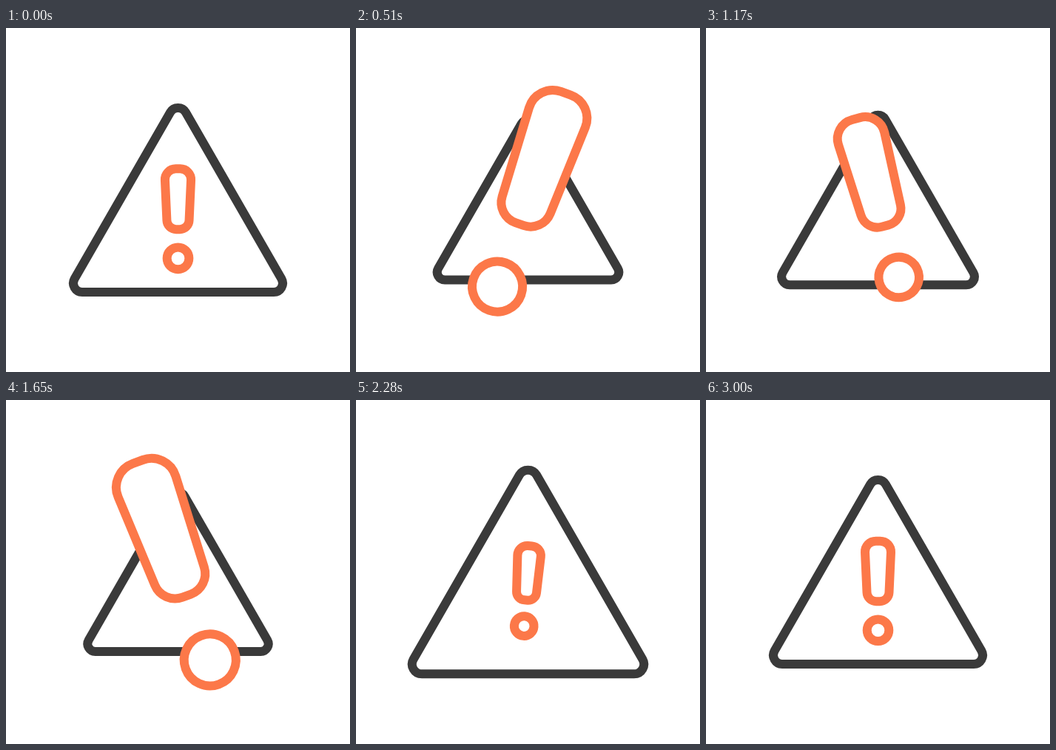
Recreate the animation shown at these times as an HTML page. Size 465 px wide and 465 px high, loop 5030 ms.

```html
<!DOCTYPE html>
<html lang="en">
<head>
<meta charset="utf-8">
<title>Warning sign</title>
<style>
  html, body { margin: 0; width: 100%; height: 100%; overflow: hidden; background: #fff; }
  svg { display: block; width: 100vw; height: 100vh; }
  path, circle { fill: #fff; stroke-width: 12; vector-effect: non-scaling-stroke; }
  #triangle { stroke: #3a3a3a; }
  #mark { stroke: #fc7849; }
</style>
</head>
<body>
<svg viewBox="0 0 465 465">
  <g transform="translate(232.5 232.5)">
    <path id="triangle"/>
    <g id="mark">
      <path id="bar"/>
      <circle cy="35" r="14.8"/>
    </g>
  </g>
</svg>
<script>
const LOOP = 5030, STEP = 30;
const PIVOT_Y = 43.7; // the mark grows from the gap between bar and dot
const triangle = document.getElementById('triangle');
const mark = document.getElementById('mark');
const bar = document.getElementById('bar');

// Outline around circles { x, y, r } listed clockwise.
function hull(circles) {
  const sides = circles.map((a, i) => {
    const b = circles[(i + 1) % circles.length];
    const dx = b.x - a.x, dy = b.y - a.y;
    const normal = Math.atan2(dy, dx) - Math.acos((a.r - b.r) / Math.hypot(dx, dy));
    const touch = c => `${c.x + c.r * Math.cos(normal)} ${c.y + c.r * Math.sin(normal)}`;
    return { r: a.r, from: touch(a), to: touch(b) };
  });
  return `M${sides[sides.length - 1].to}` +
    sides.map(s => `A${s.r} ${s.r} 0 0 1 ${s.from}L${s.to}`).join('') + 'Z';
}

// The sign leans to both sides, rebounds past its rest pose and settles.
const rebound = amount => ({ angle: 4.5 * amount, scale: 1 - .115 * amount, frame: 1 + .12 * amount });
const lean = side => ({ angle: 20 * side, scale: 2.37, frame: .863 });
const rest = rebound(0);
const poses = [
  { at: 0, ...rest },
  { at: 450, ...lean(1), bias: { angle: .8 } },
  { at: 870, scale: 1.55, frame: .95 },
  { at: 1650, ...lean(-1), bias: { frame: -.65 } },
  { at: 2190, ...rebound(1) },
  { at: 2670, ...rebound(-.15) },
  { at: 3000, ...rest }
];
const lag = { angle: 15, scale: -15, frame: 0 };

// Smoothstep; a positive bias hurries the start, a negative one delays it.
function ease(x, bias = 0) {
  const u = x * (1 + bias * (1 - x));
  return u * u * (3 - 2 * u);
}

function sample(name, time) {
  const t = time - lag[name];
  const keys = poses.filter(pose => name in pose);
  const next = keys.findIndex(pose => pose.at > t);
  if (next < 1) return rest[name];
  const a = keys[next - 1], b = keys[next];
  return a[name] + (b[name] - a[name]) * ease((t - a.at) / (b.at - a.at), a.bias?.[name]);
}

function draw(time) {
  const t = Math.floor((time % LOOP) / STEP) * STEP;
  const scale = sample('scale', t);
  const lift = 20 * Math.min(0, scale - 1);
  triangle.setAttribute('transform', `scale(${sample('frame', t)})`);
  mark.setAttribute('transform',
    `rotate(${sample('angle', t)}) translate(0 ${PIVOT_Y + lift}) scale(${scale})`);
}

const corner = (x, y, r) => ({ x, y, r });
triangle.setAttribute('d', hull([
  corner(0, -112.5, 12), corner(129.5, 112.5, 12), corner(-129.5, 112.5, 12)
]));
bar.setAttribute('d', hull([
  corner(-3, -71, 14.5), corner(3, -71, 14.5), corner(2.5, -16.5, 12.5), corner(-2.5, -16.5, 12.5)
]));

const start = performance.now();
function tick() {
  draw(performance.now() - start);
  requestAnimationFrame(tick);
}
tick();
</script>
</body>
</html>
```
